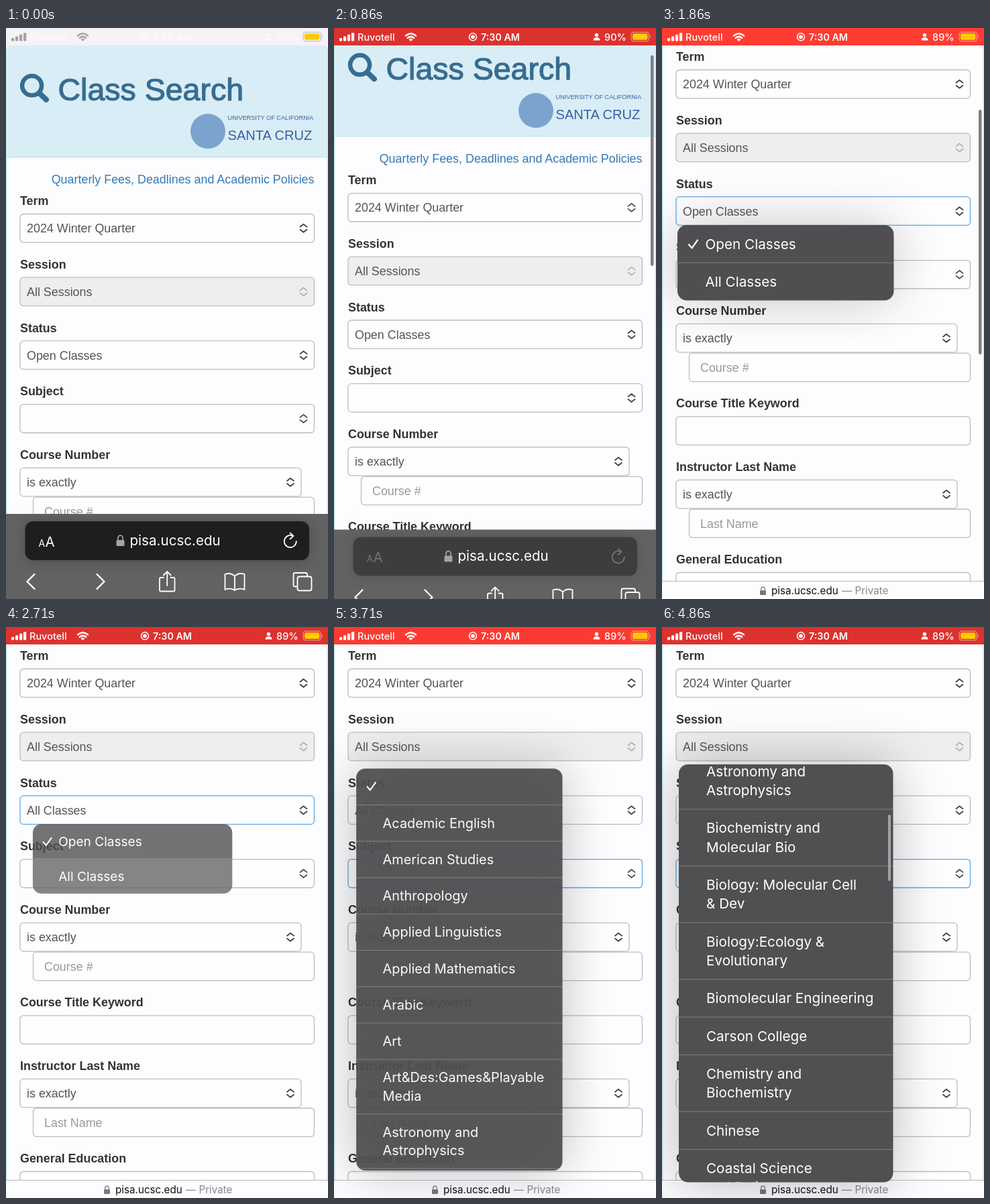
An HTML page that plays this animation: 480x852 px, repeating every 5000 ms.

```html
<!DOCTYPE html>
<html lang="en">
<head>
<meta charset="utf-8">
<title>Class Search</title>
<style>
  html, body { margin: 0; width: 100%; height: 100%; overflow: hidden; background: #fdfcfe; }
  svg { display: block; width: 480px; height: 852px; }
  text { white-space: pre; }
  .form { font: 17.9px "Liberation Sans", Arial, sans-serif; fill: #555; }
  .form .label { font-weight: bold; fill: #333; }
  .form .hint { fill: #999; }
  .ui { font-family: Inter, Roboto, sans-serif; }
  .menu { font-size: 20.7px; fill: #fff; }
  .line { fill: none; stroke-linecap: round; stroke-linejoin: round; }
  .shadow { fill: #000; filter: blur(40px); }
  #pill { filter: drop-shadow(0 2px 9px rgba(0, 0, 0, .22)); }
</style>
</head>
<body>
<svg id="stage" viewBox="0 0 480 852"></svg>
<script>
const stage = document.getElementById('stage');
const ROW = 56.4, LINE = 28.2;

const subjects = [
  '', 'Academic English', 'American Studies', 'Anthropology', 'Applied Linguistics',
  'Applied Mathematics', 'Arabic', 'Art', 'Art&Des:Games&Playable|Media',
  'Astronomy and|Astrophysics', 'Biochemistry and|Molecular Bio',
  'Biology: Molecular Cell|& Dev', 'Biology:Ecology &|Evolutionary',
  'Biomolecular Engineering', 'Carson College', 'Chemistry and|Biochemistry',
  'Chinese', 'Coastal Science|and Policy', 'College Nine', 'College Ten'
];

const esc = s => s.replace(/&/g, '&amp;');
const text = (x, y, s, attrs = '') => `<text x="${x}" y="${y}" ${attrs}>${esc(s)}</text>`;
const rect = (x, y, w, h, r, attrs = '') =>
  `<rect x="${x}" y="${y}" width="${w}" height="${h}" rx="${r}" ${attrs}/>`;
const path = (d, stroke, width, attrs = '') =>
  `<path class="line" d="${d}" stroke="${stroke}" stroke-width="${width}" ${attrs}/>`;

const label = (y, s) => text(21, y, s, 'class="label"');
const box = (x, y, w, attrs = '') =>
  rect(x, y, w, 42.4, 5, `stroke="#bdbcbf" stroke-width="1.3" fill="#fefdff" ${attrs}`);
const arrows = (x, y, color) =>
  path(`M${x - 5} ${y - 2}l5 -4 5 4M${x - 5} ${y + 2}l5 4 5 -4`, color, 1.8);

function select(y, value, { w = 438.5, id = '', off = false } = {}) {
  return box(21, y, w, `id="${id}Box" ${off ? 'style="fill:#eeedef"' : ''}`)
    + text(31, y + 27.6, value, `id="${id}Value"`)
    + arrows(w + 5, y + 21.3, off ? '#b4b3b6' : '#444');
}
const input = (y, hint) => box(40.5, y, 419) + text(57, y + 27.6, hint, 'class="hint"');

const page = `
  ${rect(.7, 26.5, 478.6, 1400, 5, 'fill="#fdfcfe" stroke="#bfe9f0" stroke-width="1.4"')}
  <path d="M1 193V31q0 -5 5 -5H474q5 0 5 5V193z" fill="#d9edf7"/>
  ${path('M1 192.6H479', '#bce3ee', 1.3)}
  <circle cx="38.6" cy="86" r="14.5" fill="none" stroke="#376d90" stroke-width="6.5"/>
  ${path('M50 97.5L60 107', '#376d90', 8)}
  ${text(77.5, 108, 'Class Search', 'font-size="46.5" fill="#376d90" stroke="#376d90" stroke-width="1.2"')}
  <circle cx="301" cy="154" r="26" fill="#7ba3cd"/>
  ${text(330.5, 137, 'UNIVERSITY OF CALIFORNIA', 'font-size="9.2" fill="#3c6193"')}
  ${text(330.5, 167, 'SANTA CRUZ', 'font-size="20.1" fill="#3560a5"')}
  ${text(459.5, 232, 'Quarterly Fees, Deadlines and Academic Policies', 'text-anchor="end" fill="#337ab7"')}
  ${label(264, 'Term')}${select(277.5, '2024 Winter Quarter')}
  ${label(358.8, 'Session')}${select(372.2, 'All Sessions', { off: true })}
  ${label(453.5, 'Status')}${select(466.9, 'Open Classes', { id: 'status' })}
  ${label(548.3, 'Subject')}${select(561.6, '', { id: 'subject' })}
  ${label(643, 'Course Number')}${select(656.4, 'is exactly', { w: 419 })}${input(700.2, 'Course #')}
  ${label(781, 'Course Title Keyword')}${box(21, 794.8, 438.5)}
  ${label(876, 'Instructor Last Name')}${select(889.4, 'is exactly', { w: 419 })}${input(933, 'Last Name')}
  ${label(1014, 'General Education')}${select(1027.5, '')}`;

const lock = (x, y, k, color) => `<g transform="translate(${x} ${y}) scale(${k})">
  ${rect(-6, -1, 12, 9, 1.5, `fill="${color}"`)}${path('M-3.6 -1V-4a3.6 3.8 0 0 1 7.2 0V-1', color, 1.7)}</g>`;

const toolbar = `
  <rect id="barBack" x="0" width="480" height="130"/>
  <g id="tools">
    ${rect(28.5, 736, 423.5, 58, 12, 'id="pill" fill="#1f1d20"')}
    <g id="pillIcons" fill="#fff">
      ${text(48.5, 773.5, 'A', 'font-size="14"')}${text(58.5, 773.5, 'A', 'font-size="20.5"')}
      ${path('M432.8 766a9 9 0 1 1 -5 -8.1M423.5 753.5l5 4.4 -5 4.6', '#fff', 1.8)}
    </g>
    <g id="address">${lock(170.5, 765, 1, '#a3a2a5')}${text(184.5, 772, 'pisa.ucsc.edu', 'font-size="20.6" fill="#fff"')}</g>
    <g id="toolIcons">
      ${path('M42.5 815L31.5 826 42.5 837M135.5 815L146.5 826 135.5 837', '#fff', 2.4)}
      ${path('M235 820H231q-2 0 -2 2V838.5q0 2 2 2H249.500q2 0 2 -2V822q0 -2 -2 -2H245.500M240.2 832V811.5M234.8 816.5l5.4 -5.5 5.4 5.5', '#fff', 1.8)}
      ${path('M341 818q-6 -6 -14.5 -3V838q8 -3 14.5 1 6.5 -4 14.5 -1V815q-8.5 -3 -14.5 3V839', '#fff', 1.8)}
      ${path('M434 833.5H431q-2.5 0 -2.5 -2.5V815.5q0 -2.5 2.5 -2.5H446.500q2.5 0 2.5 2.5V818', '#fff', 1.8)}
      ${rect(434.5, 818.5, 21, 21, 3, 'fill="none" stroke="#fff" stroke-width="1.8"')}
    </g>
  </g>
  <g id="smallBar">
    ${path('M0 825.5H480', '#b9b8bb', 1)}
    ${lock(150.5, 840, .75, '#77767a')}
    ${text(163, 845, 'pisa.ucsc.edu', 'font-size="15.2" fill="#111"')}
    ${text(268, 845, '— Private', 'font-size="15.2" fill="#89888c"')}
  </g>`;

const statusBar = `
  <rect id="statusBack" width="480" height="26"/>
  <g id="signal">${[0, 1, 2, 3].map(i => rect(8 + i * 6, 15 - i * 2.6, 4.2, 4.5 + i * 2.6, 1)).join('')}</g>
  <g id="wifi">${path('M107 11.5q7.5 -6.5 15 0M109.8 14.9q4.7 -4 9.4 0', 'currentColor', 2.5)}
    <path d="M111.5 16.9q3 -2.200 6 0L114.5 20z" fill="currentColor"/></g>
  <g id="statusText" fill="#fff" font-size="14.5" font-weight="500">
    ${text(35, 18.5, 'Ruvotell')}
    <circle cx="207" cy="13.3" r="5.5" fill="none" stroke="#fff" stroke-width="1.5"/>
    <circle cx="207" cy="13.3" r="2.9"/>
    ${text(219, 18.5, '7:30 AM', 'font-weight="600" font-size="14.3"')}
    <circle cx="391.5" cy="10.5" r="2.7"/><path d="M386.500 18.5q0 -4.5 5 -4.5t5 4.5z"/>
    ${text(403, 18.5, '90%', 'id="charge"')}
  </g>
  ${rect(443, 6.2, 26.5, 13.6, 4, 'id="battery" fill="none" stroke-width="1.1"')}
  ${rect(445, 8.2, 22.5, 9.6, 2.3, 'fill="#fc0"')}
  <path id="cap" d="M471 10.8q2 2.2 0 4.400z"/>`;

const separator = (x, y, w) => path(`M${x} ${y}h${w}`, '#fff', 1, 'opacity=".27"');
const check = (x, y) => path(`M${x} ${y}l4.5 5.5 8.5 -12`, '#fff', 2.2);

const statusMenu = `
  ${rect(23, 294, 322.5, 112.6, 14, 'class="shadow" id="statusShade"')}
  <g id="statusBody">${rect(23, 294, 322.5, 112.6, 14, 'id="statusFill" fill="#504e51"')}
    <path id="pressed" d="M23 350H345.500V392.600q0 14 -14 14H37q-14 0 -14 -14z" fill="#fff" opacity=".13"/>
    ${separator(23, 350.2, 322.5)}${check(40, 323)}
    ${text(64.5, 329.6, 'Open Classes')}${text(64.5, 386.2, 'All Classes')}</g>`;

let bottom = 205;
const rows = subjects.map((name, i) => {
  const lines = name.split('|');
  const y = bottom;
  bottom += ROW + (lines.length - 1) * LINE;
  return (i ? '' : check(42, y + 28))
    + lines.map((s, n) => text(66, y + 35.6 + n * LINE, s)).join('')
    + separator(25, bottom, 319.5);
}).join('');

const subjectMenu = `
  ${rect(25, 205, 319.5, 623.5, 14, 'class="shadow" id="subjectShade"')}
  <g id="subjectBody">${rect(25, 205, 319.5, 623.5, 14, 'fill="#504f52"')}
    <g clip-path="url(#menuClip)"><g id="rows">${rows}</g></g>
    ${rect(337, 0, 4, 99, 2, 'id="menuThumb" fill="#a2a1a4"')}</g>`;

stage.innerHTML = `
  <defs><clipPath id="menuClip">${rect(25, 205, 319.5, 623.5, 14)}</clipPath></defs>
  <rect width="480" height="852" fill="#fdfcfe"/>
  <g id="page" class="form">${page}</g>
  <rect id="pageThumb" x="472" width="4.5" rx="2.2" fill="#7f7e81"/>
  <g class="ui">${toolbar}</g>
  <g class="ui menu" id="statusMenu">${statusMenu}</g>
  <g class="ui menu" id="subjectMenu">${subjectMenu}</g>
  <g class="ui">${statusBar}</g>`;

const $ = id => document.getElementById(id);
const set = (id, attrs) => { for (const k in attrs) $(id).setAttribute(k, attrs[k]); };
const clamp = v => Math.max(0, Math.min(1, v));
const ramp = (t, a, b) => clamp((t - a) / (b - a));
const smooth = u => u * u * (3 - 2 * u);
const easeOut = u => 1 - (1 - u) ** 3;
const mix = (a, b, u) => `rgb(${a.map((v, i) => Math.round(v + (b[i] - v) * u))})`;
const zoom = (x, y, k) => `translate(${x} ${y}) scale(${k}) translate(${-x} ${-y})`;
const shown = on => ({ display: on ? 'inline' : 'none' });

function drawStatusBar(t) {
  const first = t < 100;
  const glow = .5 - .5 * Math.cos((t - 780) / 2100 * 2 * Math.PI);
  const ink = first ? '#a2a1a4' : '#fff';
  const rim = first ? '#b9b8bb' : '#f3a39e';
  set('statusBack', { fill: first ? '#f5f3f5' : mix([219, 50, 47], [255, 60, 49], glow) });
  set('signal', { fill: ink });
  set('wifi', { color: ink });
  set('statusText', { opacity: first ? .6 : 1 });
  set('battery', { stroke: rim });
  set('cap', { fill: rim });
  $('charge').textContent = t < 1400 ? '90%' : '89%';
}

function drawPage(t) {
  const scroll = 215 * smooth(ramp(t, 654, 1505));
  const drop = Math.min(101, scroll * .76);
  const p = drop / 101;
  set('page', { transform: `translate(0 ${-scroll})` });
  set('pageThumb', {
    y: 27 + .442 * scroll, height: 299 + 66 * p,
    opacity: scroll > 0 ? 1 - ramp(t, 1900, 2200) : 0
  });

  const light = ramp(p, .45, .95);
  set('barBack', { y: 725 + drop, fill: mix([98, 97, 99], [253, 252, 254], light) });
  set('tools', { transform: `translate(0 ${drop})` });
  set('pill', { opacity: clamp(1 - 2 * p) });
  set('pillIcons', { opacity: clamp(1 - 3.1 * p) });
  set('address', { opacity: 1 - ramp(p, .45, .75) });
  set('toolIcons', { opacity: 1 - ramp(p, .3, .7) });
  set('smallBar', { opacity: ramp(p, .7, 1) });

  const focus = (id, on) => set(id, { stroke: on ? '#5fa8e6' : '#bdbcbf' });
  focus('statusBox', t > 1560 && t < 2950);
  focus('subjectBox', t > 3560);
  $('statusValue').textContent = t > 2560 ? 'All Classes' : 'Open Classes';
}

function drawMenus(t) {
  const open = easeOut(ramp(t, 1500, 1850));
  const close = ramp(t, 2571.4, 2857);
  set('statusMenu', {
    ...shown(open > 0 && close < 1),
    transform: zoom(240, 294, (.35 + .65 * open) * (1 - .156 * close))
  });
  set('statusBody', { opacity: open });
  set('statusFill', { opacity: 1 - .42 * close });
  set('statusShade', { opacity: .22 * open * clamp(1 - 2 * close) });
  set('pressed', shown(t > 2420));

  const grow = easeOut(ramp(t, 3500, 3850));
  const scroll = t > 3950 ? 752 * (1 - Math.exp((3950 - t) / 681)) : 0;
  set('subjectMenu', { ...shown(grow > 0), transform: zoom(240, 367, .35 + .65 * grow) });
  set('subjectBody', { opacity: grow });
  set('subjectShade', { opacity: .27 * grow });
  set('rows', { transform: `translate(0 ${-scroll})` });
  set('menuThumb', { y: 217 + .114 * scroll, opacity: scroll > 0 ? 1 : 0 });
}

const STEP = 1000 / 7;
const start = performance.now();
function draw(now) {
  const t = Math.floor(((Math.max(0, now - start) + 5) % 5000) / STEP) * STEP;
  drawStatusBar(t);
  drawPage(t);
  drawMenus(t);
  requestAnimationFrame(draw);
}
draw(start);
</script>
</body>
</html>
```
